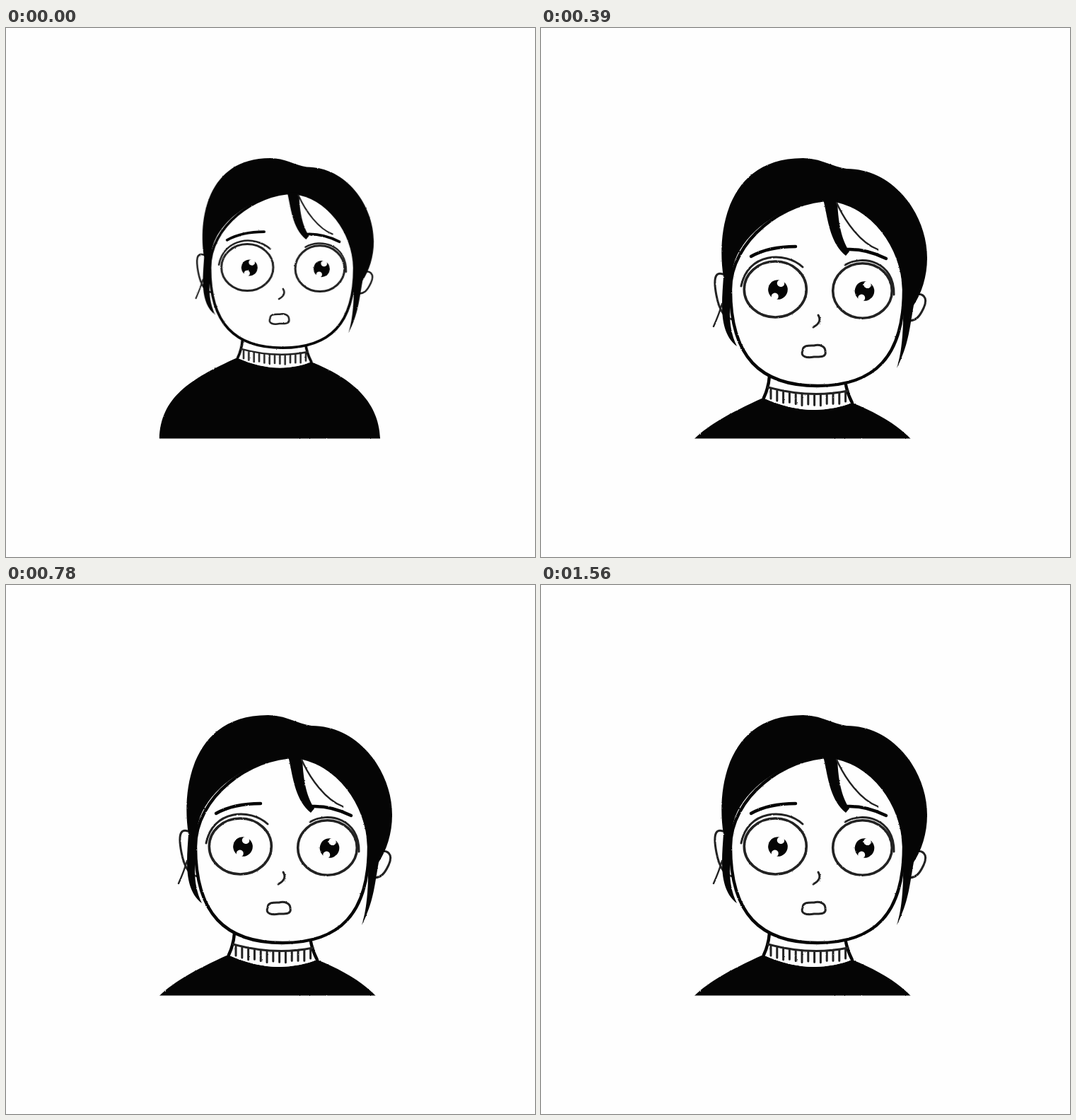
Animation, 748 px wide and 748 px high, one loop 1690 ms. Source, as an HTML page:

```html
<!DOCTYPE html>
<html lang="en">
<head>
<meta charset="utf-8">
<title>Wide-eyed portrait</title>
<style>
  html, body { margin: 0; width: 100%; height: 100%; overflow: hidden; background: #fefefe; }
  svg { display: block; width: 100vw; height: 100vh; }
  path, ellipse { fill: none; stroke: #222; stroke-width: 3; stroke-linecap: round; stroke-linejoin: round; }
  .ink { fill: #050505; stroke: none; }
  .paper { fill: #fefefe; }
  .glint { fill: #fefefe; stroke: none; }
  .bold { stroke: #050505; stroke-width: 4.4; }
  .eye { stroke-width: 3.6; }
</style>
</head>
<body>
<svg viewBox="0 0 748 748">
  <defs>
    <filter id="pencil" filterUnits="userSpaceOnUse" x="0" y="0" width="748" height="748" color-interpolation-filters="sRGB">
      <feTurbulence type="fractalNoise" baseFrequency=".45" numOctaves="2" seed="4"/>
      <feDisplacementMap in="SourceGraphic" scale="1.8" xChannelSelector="R" yChannelSelector="G"/>
    </filter>
    <clipPath id="window"><rect x="215" width="315" height="580.5"/></clipPath>
    <g id="pupil">
      <ellipse class="ink" rx="13.8" ry="13.8"/>
      <ellipse class="glint" cy="-9.8" rx="5.3" ry="5"/>
      <ellipse class="glint" cy="10.5" rx="5" ry="5"/>
    </g>
  </defs>
  <g filter="url(#pencil)">
    <g clip-path="url(#window)">
      <g class="zoom">
        <path class="ink" d="M314 523Q380 553 440 530C505 556 557 595 557 665H182C182 592 232 560 314 523Z"/>
      </g>
    </g>
    <g class="zoom">
      <!-- Neck and collar -->
      <path class="paper" style="stroke:none" d="M323 488Q322 510 314 523Q380 553 440 530Q432 515 430 488Z"/>
      <path class="bold" d="M323 492Q322 508 315 523M430 498Q432 515 440 530"/>
      <path d="M321 508Q380 524 434 513"/>
      <path id="ribs"/>

      <!-- Ears and face -->
      <path class="paper" d="M257 348C245 344 244 357 248 378S260 411 271 412"/>
      <path class="paper" d="M525 379C540 372 548 381 541 396S529 413 522 414"/>
      <path class="paper bold" d="M268 370C268 465 310 506 391 506S513 465 513 370C512 310 468 250 410 243C345 243 268 300 268 370Z"/>

      <!-- Hair -->
      <path class="ink" d="M258 352C248 290 262 184 370 184C395 184 412 196 432 199C500 199 546 265 546 325
        C546 352 538 375 527 392C521 425 520 448 503 481C511 455 513 425 512 375C512 310 468 250 410 243
        C345 243 272 295 270 350C270 385 260 415 277 450C250 430 256 385 258 352Z"/>
      <path class="ink" d="M399 242C405 265 407 303 431 322L436 316C426 300 420 280 419 242Z"/>
      <path d="M418 247C430 274 452 304 476 313M256 390Q252 404 244 422" style="stroke-width:2.4"/>

      <!-- Features -->
      <path class="bold" d="M297 323Q322 309 360 309M433 313Q460 312 488 326"/>
      <ellipse class="eye" cx="331.3" cy="369.5" rx="44" ry="39.5"/>
      <ellipse class="eye" cx="454.5" cy="371.5" rx="41.8" ry="38.8"/>
      <path d="M283 365C292 318 345 315 370 338M430 335C455 320 500 330 499 377"/>
      <path d="M392 406Q398 416 385 423"/>
      <path d="M370 456C370 448 380 449 386 449C394 447 402 450 402 457C404 466 394 465 386 465C376 467 366 465 370 456Z"/>
      <g transform="translate(335 370)"><use class="gaze" href="#pupil"/></g>
      <g transform="translate(457.5 372)"><use class="gaze" href="#pupil"/></g>
    </g>
  </g>
</svg>
<script>
const STEP = 130, STEPS = 13;
// Zoom towards the face: scale, shift x, shift y
const poses = [[.833, 65.2, 30.7], [.885, 48.3, 21.2], [.936, 27, 13.3], [1, 0, 0]];

const setAll = (selector, transform) =>
  document.querySelectorAll(selector).forEach(node => node.setAttribute('transform', transform));

let ribs = '';
for (let i = 0; i < 13; i++) {
  const sag = 6 * Math.sin(i / 12 * Math.PI);
  ribs += `M${325 + i * 8.8} ${511 + sag + i / 3}v${13 + i % 3}`;
}
document.getElementById('ribs').setAttribute('d', ribs);

function draw(now) {
  const step = Math.floor(now / STEP) % STEPS;
  const [scale, x, y] = poses[Math.min(step, poses.length - 1)];
  setAll('.zoom', `translate(${x} ${y}) scale(${scale})`);
  // The glints rock through three angles.
  setAll('.gaze', `rotate(${24 - 24 * (step % 3)})`);
  requestAnimationFrame(draw);
}
draw(performance.now());
</script>
</body>
</html>
```
